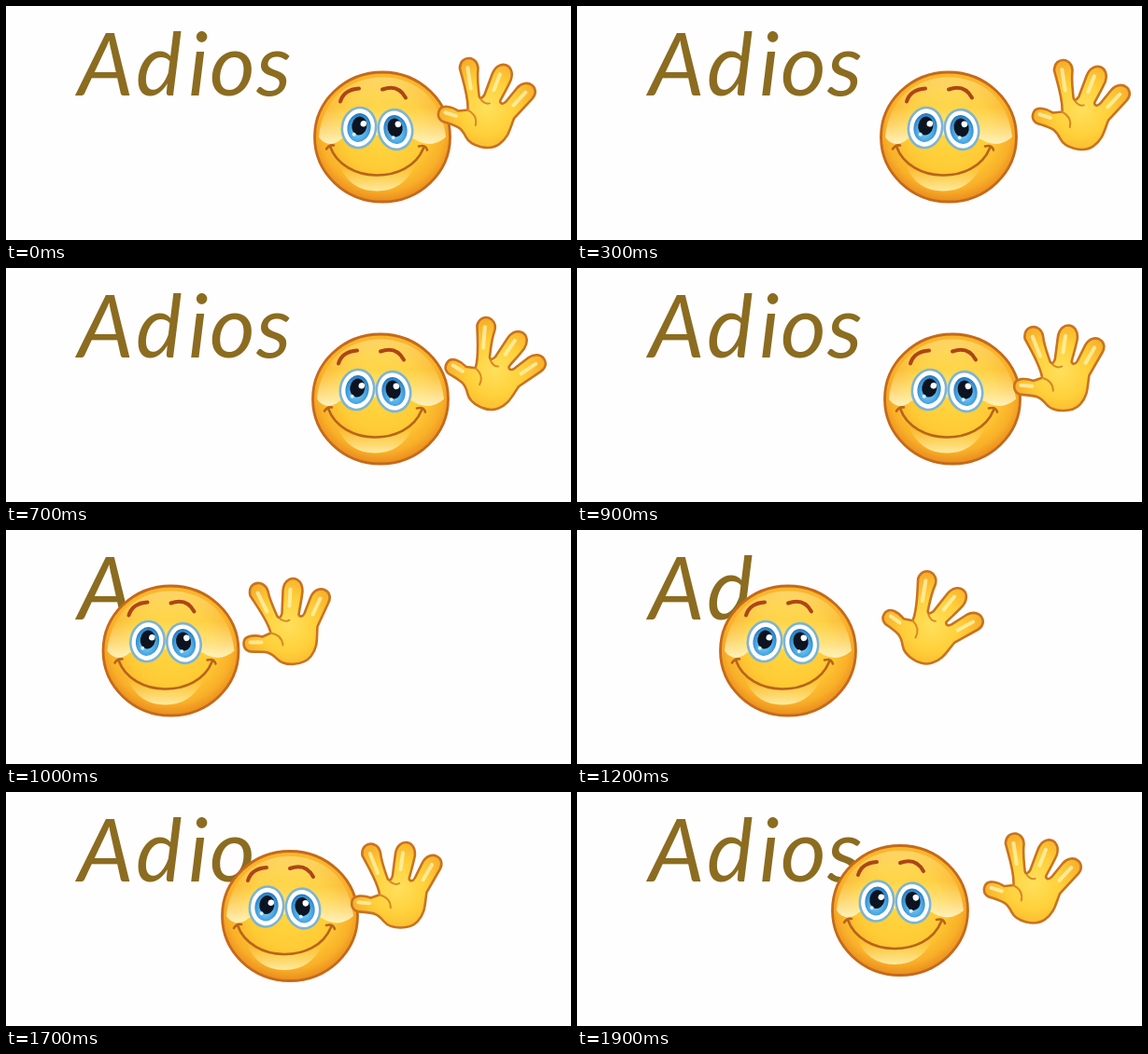
Recreate the animation shown at these times as an HTML page. Size 605 by 251 pixels, loop 2000 ms.

```html
<!DOCTYPE html>
<html lang="es">
<head>
<meta charset="utf-8">
<title>Adios</title>
<style>
  html, body { margin: 0; width: 100%; height: 100%; overflow: hidden; background: #fefefe; }
  svg { display: block; width: 605px; height: 251px; }
  text { font: italic 94px Lato, "Noto Sans", sans-serif; fill: #8b6c20; }
  .line { fill: none; stroke-linecap: round; stroke-linejoin: round; }
</style>
</head>
<body>
<svg viewBox="0 0 605 251">
  <defs>
    <radialGradient id="skin" cx=".5" cy=".45" r=".56">
      <stop offset="0" stop-color="#ffd842"/>
      <stop offset=".55" stop-color="#fecb35"/>
      <stop offset=".82" stop-color="#f9b029"/>
      <stop offset="1" stop-color="#e8871c"/>
    </radialGradient>
    <linearGradient id="shine" x1="0" y1="0" x2="0" y2="1">
      <stop offset="0" stop-color="#fff0a0" stop-opacity=".5"/>
      <stop offset=".45" stop-color="#ffe680" stop-opacity=".2"/>
      <stop offset="1" stop-color="#fff4c4" stop-opacity=".95"/>
    </linearGradient>
    <linearGradient id="glow" x1="0" y1="0" x2="0" y2="1">
      <stop offset="0" stop-color="#ffe77a" stop-opacity="0"/>
      <stop offset="1" stop-color="#fff0a8" stop-opacity=".95"/>
    </linearGradient>
    <radialGradient id="palm" gradientUnits="userSpaceOnUse" cx="-2" cy="-20" r="58">
      <stop offset="0" stop-color="#ffe05c"/>
      <stop offset=".5" stop-color="#ffd03a"/>
      <stop offset="1" stop-color="#f6a928"/>
    </radialGradient>
    <radialGradient id="iris" cx=".5" cy=".6" r=".6">
      <stop offset="0" stop-color="#8fd6fb"/>
      <stop offset=".6" stop-color="#4aa8e4"/>
      <stop offset="1" stop-color="#2376ba"/>
    </radialGradient>
    <g id="eye">
      <ellipse rx="18" ry="21.5" fill="#fff" stroke="#7db4d2" stroke-width="2.6"/>
      <ellipse rx="12.5" ry="15.5" fill="url(#iris)"/>
      <ellipse cy="-2" rx="8" ry="10" fill="#0b1420"/>
      <circle cx="4" cy="-5" r="3.3" fill="#fff"/>
      <circle cx="-4" cy="8" r="2" fill="#d5f1ff"/>
    </g>
  </defs>

  <text id="word" x="77 139 195 218 268" y="96">Adios</text>

  <g id="face">
    <ellipse rx="72.5" ry="69.5" fill="url(#skin)" stroke="#c46a1c" stroke-width="2.8"/>
    <path fill="url(#shine)" d="M-68 0C-64-40-36-64 0-64S64-40 68 0C58 9 46 10 34 2Q-5-6-44 2C-52 10-62 9-68 0Z"/>
    <path fill="url(#glow)" d="M-46 31Q-8 54 35 31Q22 58-6 58T-46 31Z"/>
    <use href="#eye" transform="translate(-25 -10) rotate(10)"/>
    <use href="#eye" transform="translate(14 -8) rotate(-12)"/>
    <g class="line" stroke="#ad4616">
      <path stroke-width="4" d="M-45-38Q-41-51-25-52M0-51Q17-57 25-42"/>
      <path stroke="#b8641b" stroke-width="2.6" d="M-56 10C-42 50 28 52 44 12M-60 13Q-57 8-52 9M39 10Q46 8 48 14"/>
    </g>
  </g>

  <g id="hand">
    <path fill="url(#palm)" stroke="#c9731f" stroke-width="2.6" stroke-linejoin="round" d="M-50 0
      C-50-9-38-9-30-7L-21-11C-24-24-36-40-43-51C-47-66-28-70-24-56
      C-22-46-18-38-14-29C-12-26-10-28-9-32L-8-56C-7-74 13-74 13-56
      C12-46 10-38 9-31C10-28 13-28 15-32L22-50C29-65 47-57 41-44L29-18
      C28-6 30 4 22 14C14 24-6 25-14 17C-22 9-26 9-38 9C-46 10-50 6-50 0Z"/>
    <path class="line" stroke="#d78a25" stroke-width="2" d="M-21-11Q-9-9-8 2M-11-26Q-5-22-1-25"/>
    <path class="line" stroke="#fff4b5" stroke-width="4" opacity=".75" d="M-35-54L-25-34M0-58L-1-40M32-48L24-31M-43-1L-31-1"/>
  </g>
</svg>
<script>
  const STEP = 100, STEPS = 20;

  // Eight-step wave: face sway, hand offset from the face, hand angle.
  const wave = [
    [3, 108, -12, 18], [2, 116, -10, 5], [0, 128, -8, 0], [-2, 138, -10, 18],
    [-4, 144, -11, 36], [-4, 140, -8, 55], [-2, 126, -10, 48], [1, 114, -13, 31]
  ];

  // Stops: first step, letters shown, face position.
  const stops = [
    [0, 5, 400, 140.5], [10, 1, 176.5, 129.5], [12, 2, 230, 129.5],
    [14, 3, 257, 117], [16, 4, 302, 133], [18, 5, 348, 127]
  ];

  const [word, face, hand] = ["word", "face", "hand"].map(id => document.getElementById(id));

  function draw() {
    const step = Math.floor(performance.now() / STEP) % STEPS;
    const [sway, dx, dy, angle] = wave[step % wave.length];
    const [, letters, baseX, y] = stops.findLast(stop => stop[0] <= step);
    const x = baseX + sway;
    word.textContent = "Adios".slice(0, letters);
    face.setAttribute("transform", `translate(${x} ${y})`);
    hand.setAttribute("transform", `translate(${x + dx} ${y + dy}) rotate(${angle})`);
    requestAnimationFrame(draw);
  }
  draw();
</script>
</body>
</html>
```
